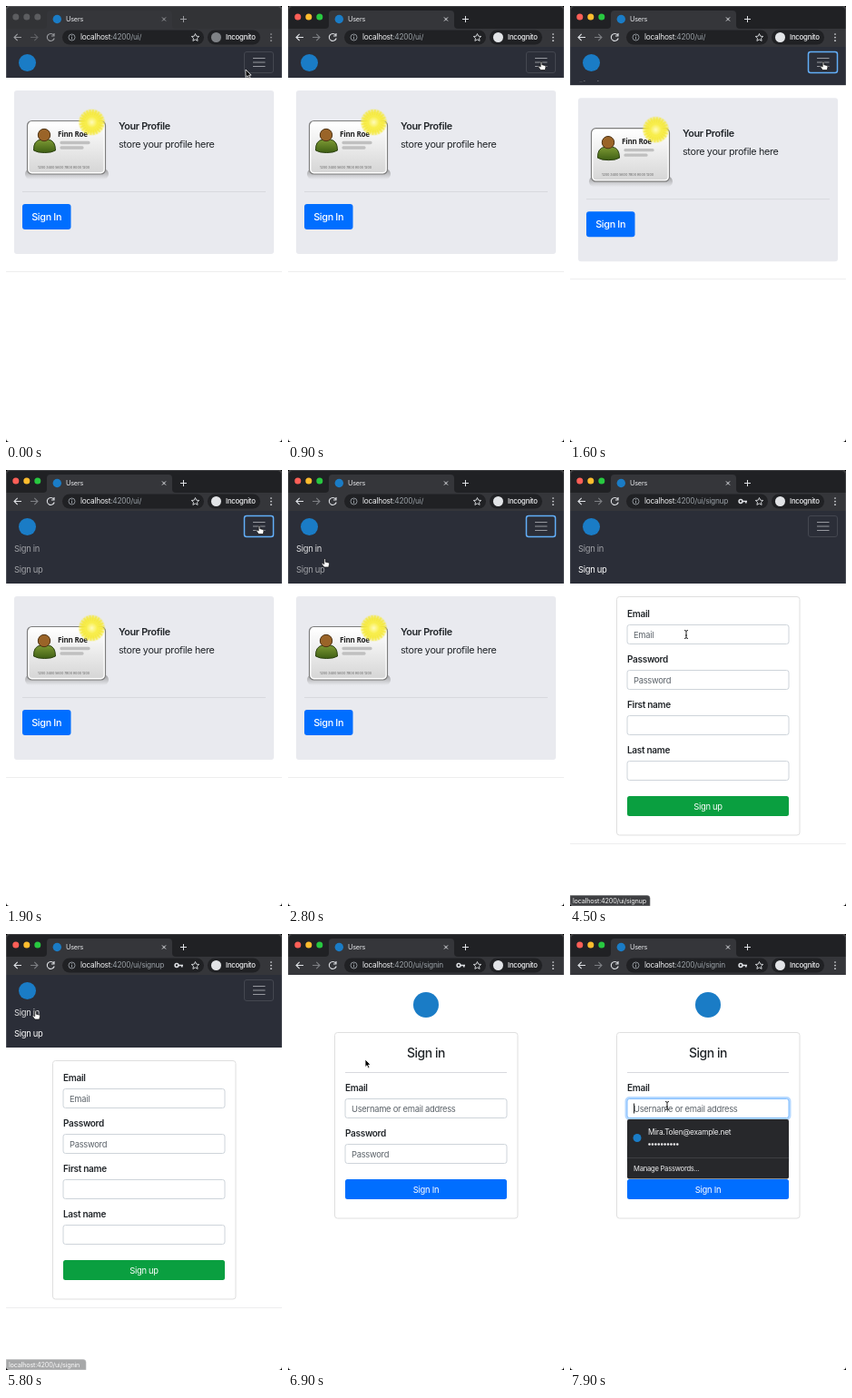
Write an HTML page that moves like this. It is 304 by 480 pixels and loops after 8000 ms.

```html
<!DOCTYPE html>
<html lang="en">
<head>
<meta charset="utf-8">
<title>Users</title>
<style>
html, body { margin: 0; width: 100%; height: 100%; overflow: hidden; background: #000; }
svg { display: block; width: 304px; height: 480px; }
text { font: 9.4px Inter, "Open Sans", sans-serif; letter-spacing: -.03em; }
.bold { font-weight: 600; }
.label { font-size: 10px; font-weight: 600; fill: #212529; }
.hint { fill: #5c636a; }
.mid { text-anchor: middle; }
.line { stroke: #d8d9de; }
.icon { fill: none; stroke: #dfe1e5; stroke-width: 1.1; }
.card { fill: #fff; stroke: #dfdfdf; }
.logo { fill: #1a7cc6; }
</style>
</head>
<body>
<svg viewBox="0 0 304 480">
  <defs>
    <rect id="field" width="178" height="21" rx="2.5" fill="#fff" stroke="#ced4da"/>
    <clipPath id="window"><rect width="304" height="480" rx="4"/></clipPath>
    <clipPath id="fold"><rect id="foldBox" y="75" width="304" height="46"/></clipPath>
    <linearGradient id="paper" x2="0" y2="1">
      <stop stop-color="#fff"/><stop offset="1" stop-color="#d6d6d6"/>
    </linearGradient>
    <linearGradient id="shade" x2="0" y2="1">
      <stop stop-color="#777" stop-opacity=".7"/><stop offset="1" stop-color="#777" stop-opacity="0"/>
    </linearGradient>
    <linearGradient id="shirt" x2="0" y2="1">
      <stop stop-color="#7d9a34"/><stop offset="1" stop-color="#3f5f14"/>
    </linearGradient>
    <radialGradient id="glow">
      <stop stop-color="#fffbb8"/><stop offset=".4" stop-color="#f8ee4a"/>
      <stop offset=".7" stop-color="#f6e93a" stop-opacity=".85"/><stop offset="1" stop-color="#f6e93a" stop-opacity="0"/>
    </radialGradient>
  </defs>

  <g clip-path="url(#window)">
    <rect width="304" height="480" fill="#fff"/>

    <g id="home">
      <rect x="9" y="93" width="286" height="180" rx="3" fill="#e9eaef"/>
      <rect x="21" y="179" width="92" height="12" rx="6" fill="url(#shade)"/>
      <rect x="23.5" y="126.5" width="86" height="58.5" rx="5" fill="#fff" stroke="#7d7d7d" stroke-width="1.2"/>
      <rect x="25.5" y="128.5" width="82" height="54.5" rx="3.5" fill="url(#paper)"/>
      <path d="M30.5 159q-.5-11 8-12h8q8 1 8 12-4 2.500-12 2.500t-12-2.500z" fill="url(#shirt)" stroke="#2d4212"/>
      <circle cx="42" cy="142" r="6.700" fill="#9a6428" stroke="#4d3213"/>
      <text x="57" y="144" style="font:700 8.1px 'Open Sans',sans-serif" fill="#222">Finn Roe</text>
      <path d="M61 150.500h30M61 156h23" stroke="#c0c0c0" stroke-width="3.300" stroke-linecap="round"/>
      <text x="35" y="178.500" style="font-size:3.800px" fill="#666">1200 3400 5600 7800 9000 1200</text>
      <circle cx="94.500" cy="128" r="15.500" fill="url(#glow)"/>
      <circle cx="94.500" cy="128" r="11" fill="none" stroke="#f6e93a" stroke-width="6" stroke-dasharray="1.700 1.180" opacity=".6"/>
      <text class="bold" x="124" y="136" style="font-size:10.800px" fill="#212529">Your Profile</text>
      <text x="124" y="156" style="font-size:10.800px" fill="#212529">store your profile here</text>
      <path class="line" d="M18 204.500h268"/>
      <rect x="18" y="218" width="53.500" height="28" rx="3" fill="#006eff"/>
      <text class="mid" x="44.700" y="236" style="font-size:10.800px;font-weight:500" fill="#fff">Sign In</text>
      <path d="M0 292.500h304" stroke="#ededee"/>
    </g>

    <g id="signup">
      <rect class="card" x="51.500" y="139.500" width="201.500" height="262.500" rx="3"/>
      <text class="label" x="63" y="161.500">Email</text>
      <use href="#field" x="63" y="170.500"/>
      <text class="hint" x="70" y="184.500">Email</text>
      <text class="label" x="63" y="211.500">Password</text>
      <use href="#field" x="63" y="220.500"/>
      <text class="hint" x="70" y="234.500">Password</text>
      <text class="label" x="63" y="261.500">First name</text>
      <use href="#field" x="63" y="270.500"/>
      <text class="label" x="63" y="311.500">Last name</text>
      <use href="#field" x="63" y="320.500"/>
      <rect x="63" y="359" width="178" height="22" rx="2.500" fill="#0a9f40"/>
      <text class="mid" x="152" y="373.500" fill="#fff">Sign up</text>
      <path d="M0 411.500h304" stroke="#ededee"/>
    </g>

    <g id="signin">
      <circle class="logo" cx="152" cy="78" r="14"/>
      <rect class="card" x="51.500" y="108.500" width="201.500" height="204.500" rx="3"/>
      <text class="mid" x="152" y="136" style="font-size:13.900px;font-weight:500" fill="#212529">Sign in</text>
      <path class="line" d="M63 152.500h178"/>
      <text class="label" x="63" y="172.500">Email</text>
      <use href="#field" x="63" y="181.500"/>
      <g id="focus">
        <rect x="62" y="180.500" width="180" height="23" rx="3.500" fill="none" stroke="#b5d8ff" stroke-width="3"/>
        <rect x="63" y="181.500" width="178" height="21" rx="2.500" fill="#fff" stroke="#80bdff"/>
        <path d="M70.500 186.500v11" stroke="#222"/>
      </g>
      <text class="hint" x="70" y="195.500">Username or email address</text>
      <text class="label" x="63" y="222.500">Password</text>
      <use href="#field" x="63" y="231.500"/>
      <text class="hint" x="70" y="245.500">Password</text>
      <rect x="63" y="270" width="178" height="22" rx="2.500" fill="#006eff"/>
      <text class="mid" x="152" y="284.500" fill="#fff">Sign In</text>
      <g id="popup" fill="#f1f1f2">
        <rect x="63" y="204" width="178" height="65.500" rx="2" fill="#27282b"/>
        <circle class="logo" cx="74" cy="224.500" r="4.500"/>
        <text x="86" y="221" style="font-size:8.300px">Mira.Tolen@example.net</text>
        <path d="M87.500 231.500h32" stroke="#f1f1f2" stroke-width="2.600" stroke-linecap="round" stroke-dasharray="0 3.420"/>
        <path d="M63 246.500h178" stroke="#3d3e42"/>
        <text x="70" y="260.500" style="font-size:7.600px">Manage Passwords...</text>
      </g>
    </g>

    <g id="nav">
      <rect id="navBar" y="45" width="304" height="34" fill="#2b2e38"/>
      <circle class="logo" cx="23.500" cy="62.500" r="9.500"/>
      <rect id="toggler" x="262.500" y="50.500" width="32" height="23" rx="2.500" fill="none"/>
      <path d="M272 57.500h13.500M272 62h13.500M272 66.500h13.500" stroke="#97999f" stroke-width="1.100"/>
      <g clip-path="url(#fold)" fill="#fff">
        <text id="linkIn" x="9" y="89.500">Sign in</text>
        <text id="linkUp" x="9" y="112.500">Sign up</text>
      </g>
    </g>

    <rect id="frame" width="304" height="26"/>
    <g id="lights"><circle cx="10.800" cy="12" r="3.500"/><circle cx="22.800" cy="12" r="3.500"/><circle cx="34.800" cy="12" r="3.500"/></g>
    <path d="M41 25q4 0 4-4V9q0-4 4-4h130q4 0 4 4v12q0 4 4 4z" fill="#35363a"/>
    <rect y="25" width="304" height="20" fill="#35363a"/>
    <circle class="logo" cx="56.300" cy="14.500" r="4.700"/>
    <text x="66" y="17" style="font-size:7.300px" fill="#e4e5e8">Users</text>
    <g id="tools">
      <path class="icon" d="M172 12.500l4 4m0-4l-4 4M192 14.500h7m-3.500-3.500v7" style="stroke-width:1"/>
      <path class="icon" d="M17 34.500H9m3.700-3.700L9 34.500l3.700 3.700"/>
      <path class="icon" d="M27 34.500h8m-3.700-3.700l3.700 3.700-3.700 3.700" style="stroke:#7d7f83"/>
      <path class="icon" d="M52.500 32a4 4 0 1 0 .7 3.500M53 30v3h-3"/>
      <path d="M292 31v8" stroke="#dfe1e5" stroke-width="1.700" stroke-linecap="round" stroke-dasharray="0 3.600"/>
    </g>
    <rect x="62" y="26.500" width="156" height="16" rx="8" fill="#202124"/>
    <circle class="icon" cx="72.500" cy="34.500" r="3.500" style="stroke:#9aa0a6;stroke-width:.9"/>
    <path d="M72.500 32.300v1m0 .8v2.500" stroke="#9aa0a6"/>
    <text x="82" y="37.300" style="font-size:8.300px" fill="#9aa0a6"><tspan fill="#f0f1f3">localhost</tspan>:4200/ui/<tspan id="route"></tspan></text>
    <g id="key"><circle class="icon" cx="188" cy="34.500" r="1.900" style="stroke-width:1.500"/><path class="icon" d="M190 34.500h5m-1.200 0v2" style="stroke-width:1.500"/></g>
    <path class="icon" d="M208.500 30.500l1.200 2.700 3 .3-2.200 2 .6 2.900-2.600-1.500-2.600 1.500.6-2.900-2.200-2 3-.3z" style="stroke-width:.9"/>
    <rect x="222" y="26.500" width="58" height="16" rx="8" fill="#202124"/>
    <circle id="badge" cx="231.500" cy="34.500" r="5.500"/>
    <text x="242" y="37.300" style="font-size:7.800px;font-weight:500" fill="#f0f1f3">Incognito</text>

    <g id="status">
      <path d="M0 468.500h85q3 0 3 3V480H0z" fill="#3f4043" stroke="#66676a" stroke-width=".6"/>
      <text id="statusText" x="3" y="477" style="font-size:7.300px" fill="#f2f2f2"></text>
    </g>
    <rect x=".5" y=".5" width="303" height="479" rx="4" fill="none" stroke="#fff" opacity=".15"/>
  </g>

  <g id="cursor" stroke-linejoin="round">
    <path id="arrow" d="M0 0v8.500l2-1.800 1.400 3 1.500-.7-1.400-2.900h2.600z" fill="#000" stroke="#fff" stroke-width=".8"/>
    <path id="hand" d="M-.8.700q.8-1 1.600 0v3l3.300.8q1 .3.900 1.500l-.7 3.500H-.7l-2.600-3.500q-.2-1.400 1.200-.7l1.300.8z" fill="#fff" stroke="#111" stroke-width=".7"/>
    <path id="beam" d="M-2-4.500q2 0 2 1.300q0-1.300 2-1.300M0-3.200v6.400M-2 4.500q2 0 2-1.300q0 1.300 2 1.300M-1 1h2" fill="none" stroke="#222"/>
  </g>
</svg>

<script>
const LOOP = 8000;
const el = id => document.getElementById(id);
const set = (id, attrs) => { for (const k in attrs) el(id).setAttribute(k, attrs[k]); };
const show = (id, on) => { el(id).style.display = on ? "" : "none"; };
const ramp = (t, from, to) => Math.min(1, Math.max(0, (t - from) / (to - from)));
const smooth = u => u * u * (3 - 2 * u);
const within = (t, from, to) => t >= from && t < to;

// time, x, y of the pointer
const path = [
  [0, 264, 70], [500, 279, 61], [1900, 279, 61], [2500, 31, 86], [2800, 40.5, 97.5],
  [3000, 33, 106], [4100, 33, 106], [4500, 128, 181], [5000, 128, 181],
  [5700, 32.5, 84.5], [6300, 32.5, 84.5], [6900, 85, 138], [7400, 107, 189], [8000, 107, 189]
];
const shapes = [
  [0, "arrow"], [300, "hand"], [1980, "arrow"], [2400, "hand"], [4180, "arrow"],
  [4400, "beam"], [5200, "arrow"], [5600, "hand"], [6200, "arrow"], [7250, "beam"]
];

function pointer(t) {
  const i = path.findIndex(p => p[0] > t);
  const [t0, x0, y0] = path[i - 1], [t1, x1, y1] = path[i];
  const u = smooth(ramp(t, t0, t1));
  set("cursor", { transform: `translate(${x0 + (x1 - x0) * u} ${y0 + (y1 - y0) * u})` });
  const shape = shapes.filter(s => s[0] <= t).pop()[1];
  ["arrow", "hand", "beam"].forEach(id => show(id, id === shape));
}

function draw(t) {
  const active = t >= 700;
  const page = t < 3300 ? "home" : t < 6100 ? "signup" : "signin";
  ["home", "signup", "signin"].forEach(id => show(id, id === page));
  show("nav", page !== "signin");
  show("key", page !== "home");
  el("route").textContent = page === "home" ? "" : page;

  set("frame", { fill: active ? "#202124" : "#323336" });
  set("tools", { opacity: active ? 1 : .6 });
  set("badge", { fill: active ? "#e2e4e7" : "#7f8286" });
  const lights = active ? ["#ff5f57", "#febc2e", "#28c840"] : Array(3).fill("#5c5d60");
  [...el("lights").children].forEach((c, i) => c.setAttribute("fill", lights[i]));

  const open = 46 * smooth(ramp(t, 1507, 1857));
  set("navBar", { height: 34 + open });
  set("foldBox", { height: open });
  set("home", { transform: `translate(0 ${open})` });
  const focused = within(t, 1450, 3200);
  set("toggler", { stroke: focused ? "#62aef8" : "#444750", "stroke-width": focused ? 1.5 : 1 });

  const hoverIn = within(t, 2400, 2850) || within(t, 5650, 6300);
  set("linkIn", { opacity: hoverIn ? .85 : .55 });
  set("linkUp", { opacity: page === "signup" ? 1 : within(t, 2850, 3300) ? .85 : .55 });

  const first = t < 5000;
  el("statusText").textContent = "localhost:4200/ui/" + (first ? "signup" : "signin");
  const fade = first ? ramp(t, 2950, 3150) - ramp(t, 4500, 4700)
                     : ramp(t, 5710, 5910) - ramp(t, 6400, 6600);
  set("status", { opacity: fade });

  show("focus", t >= 7550);
  show("popup", t >= 7600);
  pointer(t);
}

function tick() {
  draw(performance.now() % LOOP);
  requestAnimationFrame(tick);
}
tick();
</script>
</body>
</html>
```
